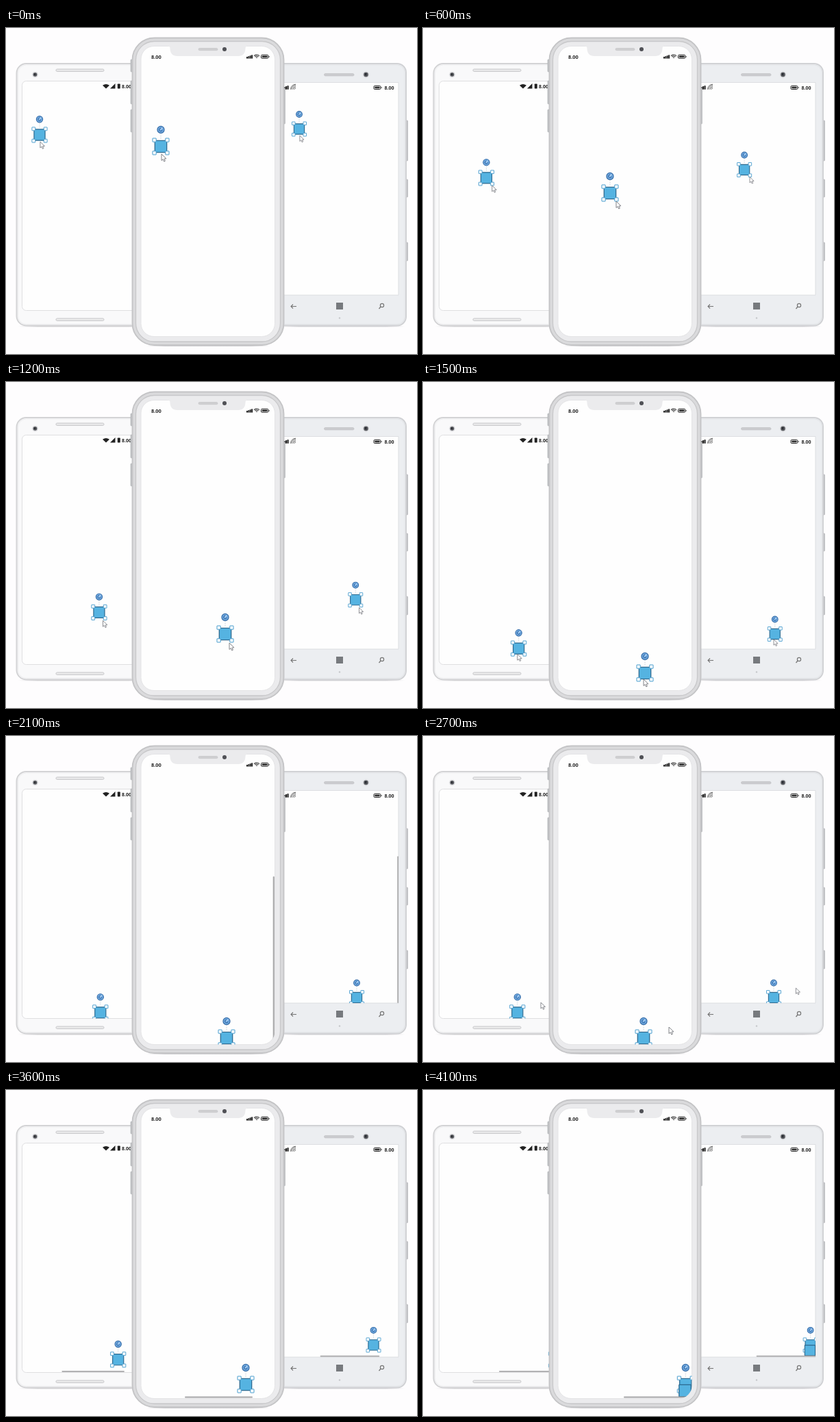
An HTML page with a canvas that plays this animation: 600 px wide and 476 px high, repeating every 4.2 s.

```html
<!DOCTYPE html>
<html lang="en">
<head>
<meta charset="utf-8">
<title>Dragging a shape on three phones</title>
<style>
html, body { margin: 0; width: 600px; height: 476px; overflow: hidden; background: #fefdfe; }
canvas { display: block; width: 600px; height: 476px; }
</style>
</head>
<body>
<canvas id="stage"></canvas>
<script>
const LOOP = 4200, STEP = 100;
const canvas = document.getElementById('stage');
const ratio = window.devicePixelRatio || 1;
canvas.width = 600 * ratio;
canvas.height = 476 * ratio;
const ctx = canvas.getContext('2d');

// Keys are [time, x, y] in the coordinates of the middle phone.
const shapeKeys = [
  [0, 226, 173], [100, 229, 177], [600, 273, 241], [900, 316, 306], [1200, 320, 368],
  [1500, 324, 425], [1700, 322, 441], [3000, 322, 441], [3300, 350, 439],
  [3400, 350, 430], [3700, 350, 430], [4100, 383.3, 430]
];
const cursorKeys = [
  [0, 227, 184], [600, 282, 253], [900, 333, 321], [1200, 326, 381], [1500, 322, 434],
  [1700, 322, 444], [2600, 364, 424], [2700, 359, 425], [2900, 325, 441],
  [3000, 325, 441], [3300, 352, 441]
];
const barTopKeys = [[1800, 150], [2100, 205], [2400, 215]];
const barLeftKeys = [[3400, 250], [3600, 261], [3700, 261], [4100, 293]];

function sample(keys, t) {
  const next = keys.findIndex(k => k[0] > t);
  if (next < 0) return keys[keys.length - 1].slice(1);
  if (next === 0) return keys[0].slice(1);
  const a = keys[next - 1], b = keys[next];
  const p = (t - a[0]) / (b[0] - a[0]);
  return a.slice(1).map((v, i) => v + (b[i + 1] - v) * p);
}

function paint(fill, stroke, width = 1) {
  if (fill) { ctx.fillStyle = fill; ctx.fill(); }
  if (stroke) { ctx.strokeStyle = stroke; ctx.lineWidth = width; ctx.stroke(); }
}
function box(x, y, w, h, r, fill, stroke, width) {
  ctx.beginPath();
  ctx.roundRect(x, y, w, h, r);
  paint(fill, stroke, width);
}
function disc(x, y, r, fill, stroke, width) {
  ctx.beginPath();
  ctx.arc(x, y, r, 0, Math.PI * 2);
  paint(fill, stroke, width);
}
function poly(points, fill, stroke, width) {
  ctx.beginPath();
  points.forEach(([x, y]) => ctx.lineTo(x, y));
  ctx.closePath();
  paint(fill, stroke, width);
}
function line(points, color, width) {
  ctx.beginPath();
  points.forEach(([x, y]) => ctx.lineTo(x, y));
  paint(null, color, width);
}
function label(x, y, size) {
  ctx.font = `700 ${size}px "Open Sans", sans-serif`;
  ctx.fillStyle = '#222';
  ctx.fillText('8.00', x, y);
}
function bars(x, y, w, h) {
  for (let i = 0; i < 4; i++) {
    const tall = h * (0.5 + i / 6);
    ctx.fillStyle = '#222';
    ctx.fillRect(x + i * w / 4, y - tall, w / 4 - 0.4, tall);
  }
}
function battery(x, y, w, h) {
  box(x, y, w - 1.2, h, 1.2, '#fff', '#222', 1);
  ctx.fillStyle = '#222';
  ctx.fillRect(x + 1.3, y + 1.3, w - 3.8, h - 2.6);
  ctx.fillRect(x + w - 0.4, y + h / 3, 1, h / 3);
}
function lens(x, y, r) {
  disc(x, y, r + 1, '#dcdde0', '#c6c7ca', 0.6);
  disc(x, y, r, '#505257');
  disc(x - 0.4, y - 0.4, r * 0.4, '#24272c');
}
function shadow(x, w, y) {
  const g = ctx.createLinearGradient(x, 0, x + w, 0);
  g.addColorStop(0, 'rgba(150,150,155,0)');
  g.addColorStop(0.15, 'rgba(150,150,155,.45)');
  g.addColorStop(0.85, 'rgba(150,150,155,.45)');
  g.addColorStop(1, 'rgba(150,150,155,0)');
  ctx.fillStyle = g;
  ctx.fillRect(x, y, w, 1.4);
}
function sideButton(x, y, w, h) {
  box(x, y, w, h, 1, '#bfc0c3', '#b1b2b5', 0.6);
}

function square(x, y) {
  box(x - 8.7, y - 8.7, 17.4, 17.4, 0.5, '#55b3e1', '#2d6a90', 1.3);
}
function handles(x, y) {
  for (const dx of [-9.4, 9.4])
    for (const dy of [-9.4, 9.4])
      box(x + dx - 2.6, y + dy - 2.6, 5.2, 5.2, 0.3, '#fff', '#459bcd', 1);
}
function rotator(x, y) {
  ctx.setLineDash([1.5, 1.5]);
  line([[x, y - 19], [x, y - 10]], '#b9c6d0', 0.8);
  ctx.setLineDash([]);
  disc(x, y - 24.6, 5, '#70a9e0', '#3a70aa', 1.3);
  ctx.beginPath();
  ctx.arc(x, y - 24.6, 2.3, 0.2, 4.7);
  paint(null, '#2b5f9b', 1);
  line([[x - 0.5, y - 24.6], [x + 2.5, y - 27]], '#e0eefb', 1);
}
function cursor(x, y) {
  poly([[0, 0], [0, 9.5], [2.2, 7.6], [3.8, 11], [5.4, 10.2], [3.9, 7], [7, 6.8]]
    .map(([dx, dy]) => [x + dx, y + dy]), '#fff', '#74767c', 0.9);
}

// Maps the middle phone's coordinates onto a phone's own screen.
function scene(t, originX, originY, scale) {
  ctx.translate(originX, originY);
  ctx.scale(scale, scale);
  ctx.translate(-226, -173);
  const [x, y] = sample(shapeKeys, t);
  rotator(x, y);
  square(x, y);
  handles(x, y);
  if (t >= 4000) square(x - 0.8, y + 9);
  if (t >= 1800 && t <= 2400) {
    const [top] = sample(barTopKeys, t);
    box(389.7, top, 2.2, 450 - top, 1, '#acacad');
  }
  if (t >= 3400) {
    const [left] = sample(barLeftKeys, t);
    box(left, 447.5, 99, 2, 1, '#a6a6a8');
  }
  if (t < 1800 || (t >= 2600 && t < 3400)) cursor(...sample(cursorKeys, t));
}
function screen(x, y, w, h, r, edge, content) {
  box(x, y, w, h, r, '#fefefe', edge, 1);
  ctx.save();
  ctx.beginPath();
  ctx.roundRect(x, y, w, h, r);
  ctx.clip();
  content();
  ctx.restore();
}

function leftPhone(t) {
  shadow(18, 190, 435);
  box(15.5, 52, 240, 382.5, 14, '#f9f9fa', '#d3d3d5', 2);
  box(17.5, 54, 240, 378.5, 12, null, '#ededef', 1);
  for (const y of [60, 424]) box(73, y, 70, 3.5, 1.7, '#e9e9ea', '#c9c9cb', 1);
  lens(42.5, 68, 2.8);
  screen(23.5, 77.5, 210, 335, 6, '#dfdfe1', () => scene(t, 49, 156, 0.925));
  ctx.beginPath();
  ctx.moveTo(146, 88.5);
  ctx.lineTo(141, 83.8);
  ctx.quadraticCurveTo(146, 80.2, 151, 83.8);
  ctx.closePath();
  paint('#222');
  poly([[152, 88.5], [159.5, 88.5], [159.5, 81]], '#222');
  box(162.8, 81.5, 4, 7, 0.8, '#222');
  label(169, 88.2, 7);
}

function rightPhone(t) {
  shadow(400, 182, 435);
  for (const [y, h] of [[135, 59], [221, 26], [313, 27]]) sideButton(583, y, 3.5, h);
  box(360, 52, 224, 382.5, 13, '#eceef1', '#d1d2d5', 2);
  box(360, 54, 222, 378.5, 11, null, '#e2e4e7', 1);
  box(464.5, 66.5, 43.5, 3.5, 1.7, '#cbcccf', '#bfc0c3', 0.6);
  lens(525.5, 68, 3.2);
  screen(370, 79.5, 203, 310.5, 0, '#dcdee1', () => scene(t, 428, 147.5, 0.875));
  bars(403, 89.7, 10, 5.5);
  for (const r of [2, 4, 6, 7.5]) {
    ctx.beginPath();
    ctx.arc(423, 89.7, r, Math.PI, Math.PI * 1.5);
    paint(null, '#555', 0.9);
  }
  battery(537, 84.5, 11, 5);
  label(552.4, 89.6, 7);
  line([[424, 406.5], [416, 406.5]], '#777', 1.1);
  line([[419, 403.5], [416, 406.5], [419, 409.5]], '#777', 1.1);
  box(482, 401, 10, 10, 0, '#777a7e');
  disc(549, 405, 2.6, null, '#777', 1.2);
  line([[547, 407], [544.5, 410]], '#777', 1.3);
  disc(487, 423.5, 1.2, '#c5c7ca');
}

function middlePhone(t) {
  shadow(205, 180, 463.5);
  for (const [y, h] of [[46, 18], [77, 34], [119, 33]]) sideButton(182, y, 3, h);
  sideButton(405, 88, 2.5, 52);
  box(184.5, 14.5, 221, 448.5, 32, '#dadadc', '#c4c4c6', 1.8);
  box(189.5, 19.5, 211, 438.5, 27, '#ebebed', '#c8c8ca', 1.3);
  screen(197, 26.5, 195.5, 424, 19, '#e4e4e6', () => scene(t, 226, 173, 1));
  ctx.beginPath();
  ctx.moveTo(235, 25.5);
  ctx.quadraticCurveTo(239.5, 26, 239.5, 30);
  ctx.quadraticCurveTo(240, 41, 250, 41);
  ctx.lineTo(339, 41);
  ctx.quadraticCurveTo(349, 41, 349.5, 30);
  ctx.quadraticCurveTo(349.5, 26, 354, 25.5);
  ctx.closePath();
  paint('#ebebed');
  box(281, 29.5, 28, 3.2, 1.6, '#cfcfd1', '#c3c3c5', 0.6);
  disc(319, 31, 3, '#505156');
  label(212, 44.5, 7.4);
  bars(351, 44.6, 9.5, 5.2);
  for (const r of [1.4, 3.4, 5.4]) {
    ctx.beginPath();
    ctx.arc(366, 44.4, r, Math.PI * 1.24, Math.PI * 1.76);
    paint(null, '#222', 1.1);
  }
  battery(372.5, 39.3, 11.5, 5);
}

function render(now) {
  const t = Math.floor((now % LOOP) / STEP) * STEP;
  ctx.setTransform(ratio, 0, 0, ratio, 0, 0);
  ctx.fillStyle = '#fefdfe';
  ctx.fillRect(0, 0, 600, 476);
  leftPhone(t);
  rightPhone(t);
  middlePhone(t);
}

const start = performance.now();
function tick() {
  render(performance.now() - start);
  requestAnimationFrame(tick);
}
tick();
</script>
</body>
</html>
```
